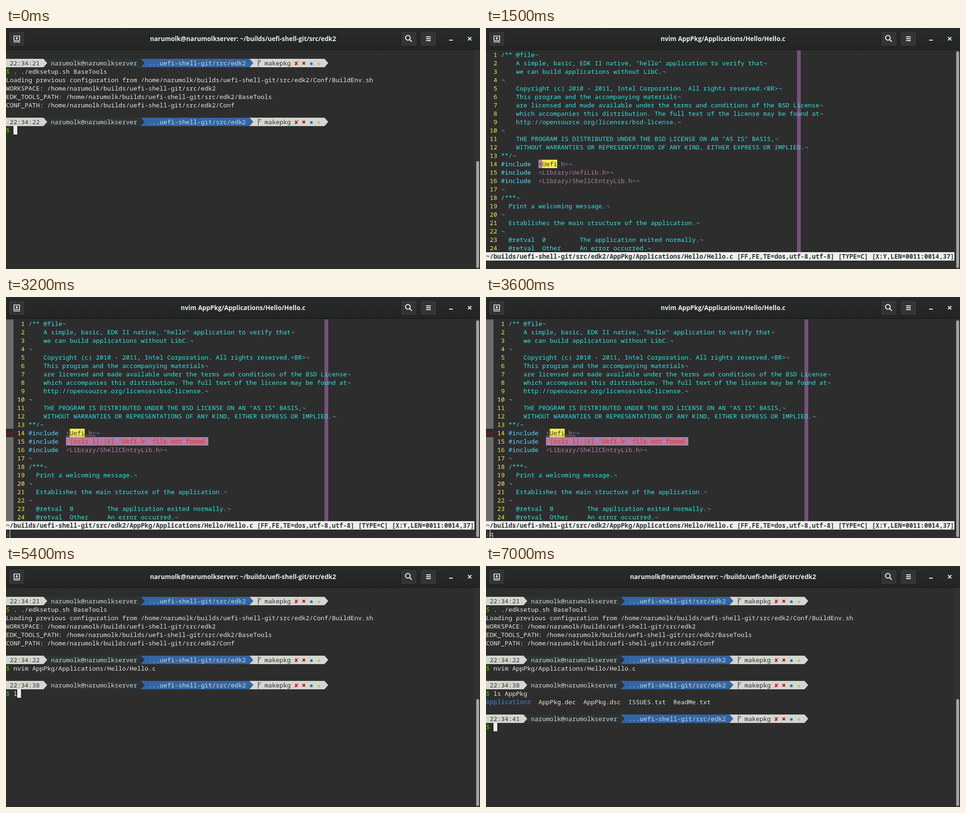
These frames come from a looping animation (1012x516 px, 8 s). An HTML page with a canvas:

```html
<!DOCTYPE html>
<html lang="en">
<head>
<meta charset="utf-8">
<title>Terminal session</title>
<style>
html, body { margin: 0; width: 100%; height: 100%; overflow: hidden; background: #2d2d2d; }
canvas { display: block; }
</style>
</head>
<body>
<canvas id="stage" width="1012" height="516"></canvas>
<script>
const ctx = document.getElementById('stage').getContext('2d');
const LOOP = 8000, CW = 8, CH = 18, TOP = 48;
const MONO = '13.333px "Noto Sans Mono", "Liberation Mono", monospace';
const SYMBOL = '13.333px "DejaVu Sans Mono", "DejaVu Sans", monospace';
const BG = '#2d2d2d', FG = '#e6e6e3', LIGHT = '#d3d7cf', DARK = '#2e3436', BLUE = '#3465a4',
  WHITE = '#eeeeec', YELLOW = '#fce94f', CYAN = '#34e2e2', PURPLE = '#ad7fa8', SKY = '#5fd7ff';

const USER = 'narumolk';
const HOST = USER + '@' + USER + 'server';
const REPO = 'builds/uefi-shell-git/src/edk2';
const HOME = '/home/' + USER + '/' + REPO;
const EDIT = 'nvim AppPkg/Applications/Hello/Hello.c';
const LIST = 'ls AppPkg';
const STATUS = `~/${REPO}/AppPkg/Applications/Hello/Hello.c` +
  ' [FF,FE,TE=dos,utf-8,utf-8] [TYPE=C] [X:Y,LEN=0011:0014,37]';

const SOURCE = `/** @file
    A simple, basic, EDK II native, "hello" application to verify that
    we can build applications without LibC.

    Copyright (c) 2010 - 2011, Intel Corporation. All rights reserved.<BR>
    This program and the accompanying materials
    are licensed and made available under the terms and conditions of the BSD License
    which accompanies this distribution. The full text of the license may be found at
    http://opensource.org/licenses/bsd-license.

    THE PROGRAM IS DISTRIBUTED UNDER THE BSD LICENSE ON AN "AS IS" BASIS,
    WITHOUT WARRANTIES OR REPRESENTATIONS OF ANY KIND, EITHER EXPRESS OR IMPLIED.
**/
#include  <Uefi.h>
#include  <Library/UefiLib.h>
#include  <Library/ShellCEntryLib.h>

/***
  Print a welcoming message.

  Establishes the main structure of the application.

  @retval  0         The application exited normally.
  @retval  Other     An error occurred.`.split('\n');

// Keystrokes: [time, characters visible from then on]
const EDIT_KEYS = [[500, 1], [600, 2], [800, EDIT.length]];
const LIST_KEYS = [[5400, 1], [5500, 2], [5700, 3], [5900, 4], [6000, 5], [6400, LIST.length]];

const rowY = row => TOP + row * CH;

function box(x, y, w, h, color) {
  ctx.fillStyle = color;
  ctx.fillRect(x, y, w, h);
}

function cells(col, row, count, color) {
  box(col * CW, rowY(row), count * CW, CH, color);
}

function text(str, col, row, color = FG, font = MONO) {
  ctx.font = font;
  ctx.fillStyle = color;
  ctx.fillText(str, col * CW, rowY(row) + 14);
}

function stroke(path, color, width) {
  ctx.strokeStyle = color;
  ctx.lineWidth = width;
  ctx.stroke(new Path2D(path));
}

function round(x, y, w, h, r, color) {
  ctx.beginPath();
  ctx.roundRect(x, y, w, h, r);
  ctx.fillStyle = color;
  ctx.fill();
}

function typed(str, keys, t) {
  let count = 0;
  for (const [at, n] of keys) if (t >= at) count = n;
  return str.slice(0, count);
}

function header(title) {
  const shade = ctx.createLinearGradient(0, 0, 0, 46);
  shade.addColorStop(0, '#272b2a');
  shade.addColorStop(1, '#222524');
  box(0, 0, 1012, 46, shade);
  box(0, 46, 1012, 1, '#191b1a');
  for (const x of [5, 842, 884]) {
    round(x, 6, 36, 34, 5, '#171918');
    round(x + 1, 7, 34, 32, 4, '#323534');
  }
  stroke('M17 17H29V27H17ZM23 19V25M20 22H26M16 30H30', WHITE, 1.7);
  stroke('M863 21A5 5 0 1 1 853 21A5 5 0 1 1 863 21M861.5 24.5L866.5 29.5', WHITE, 2.2);
  for (const y of [18, 22, 26]) box(897, y, 10, 2, WHITE);
  box(946, 25, 8, 2, WHITE);
  stroke('M986.5 19.5L993.5 26.5M993.5 19.5L986.5 26.5', WHITE, 2);
  ctx.font = 'bold 13.35px "Open Sans", "Noto Sans", sans-serif';
  ctx.fillStyle = WHITE;
  ctx.textAlign = 'center';
  ctx.fillText(title, 506, 28);
  ctx.textAlign = 'left';
}

function scrollbar(top) {
  box(1001, 47, 11, 469, '#323232');
  round(1004, top, 6, 514 - top, 3, '#a4a4a2');
}

function arrow(col, row, color, behind) {
  const x = col * CW, y = rowY(row);
  cells(col, row, 1, behind);
  ctx.fillStyle = color;
  ctx.fill(new Path2D(`M${x} ${y}l8 9l-8 9z`));
}

function prompt(row, clock) {
  cells(0, row, 10, LIGHT);
  cells(11, row, 25, DARK);
  cells(37, row, 28, BLUE);
  cells(66, row, 19, LIGHT);
  arrow(10, row, LIGHT, DARK);
  arrow(36, row, DARK, BLUE);
  arrow(65, row, BLUE, LIGHT);
  arrow(85, row, LIGHT, BG);
  text(clock, 1, row, DARK);
  text(HOST, 12, row, LIGHT);
  text('...uefi-shell-git/src/edk2', 38, row, LIGHT);
  stroke(`M538.5 ${rowY(row) + 1}v16M538.5 ${rowY(row) + 12}q0 -2 2 -4t2 -5M540.5 ${rowY(row) + 5}l2 -2l2 2`, DARK, 1);
  text('makepkg', 69, row, DARK);
  text('✘', 77, row, '#cc0000', SYMBOL);
  text('✖', 79, row, '#cc0000', SYMBOL);
  text('✹', 81, row, BLUE, SYMBOL);
  text('✭', 83, row, '#c4a000', SYMBOL);
}

function command(row, str, active) {
  text('$', 0, row, '#4e9a06', 'bold ' + MONO);
  text(str, 2, row);
  if (active) cells(2 + str.length, row, 1, WHITE);
}

function shell(t) {
  const edited = t >= 3900, listed = t >= 7000;
  header(t >= 6700 && !listed ? LIST : `${HOST}: ~/${REPO}`);
  scrollbar(285);
  prompt(1, '22:34:21');
  command(2, '. ./edksetup.sh BaseTools');
  text(`Loading previous configuration from ${HOME}/Conf/BuildEnv.sh`, 0, 3);
  text('WORKSPACE: ' + HOME, 0, 4);
  text(`EDK_TOOLS_PATH: ${HOME}/BaseTools`, 0, 5);
  text(`CONF_PATH: ${HOME}/Conf`, 0, 6);
  prompt(8, '22:34:22');
  command(9, typed(EDIT, EDIT_KEYS, t), !edited);
  if (!edited) return;
  prompt(11, '22:34:38');
  command(12, typed(LIST, LIST_KEYS, t), !listed);
  if (!listed) return;
  text('Applications', 0, 13, BLUE, 'bold ' + MONO);
  text('AppPkg.dec  AppPkg.dsc  ISSUES.txt  ReadMe.txt', 14, 13);
  prompt(15, '22:34:41');
  command(16, '', true);
}

function editor(t) {
  const checked = t >= 1700;
  const shift = checked ? 2 : 0, left = 4 + shift;
  header(EDIT);
  scrollbar(50);
  cells(left + 79, 0, 1, '#75507b');
  box((left + 79) * CW, TOP, CW, 24 * CH, '#75507b');

  SOURCE.forEach((line, row) => {
    const number = String(row + 1);
    if (checked && row !== 13) cells(0, row, 2, '#6c6c6c');
    text(number, 3 + shift - number.length, row, YELLOW);
    if (checked && row === 14) {
      text('#include', left, row, SKY);
      cells(left + 10, row, 38, PURPLE);
      text("[ccls 1] [E] 'Uefi.h' file not found", left + 11, row, '#e8443a', 'bold ' + MONO);
      return;
    }
    if (line.startsWith('#')) {
      text('#include', left, row, SKY);
      text(line.slice(10), left + 10, row, PURPLE);
    } else {
      text(line, left, row, CYAN);
    }
    text('¬', left + line.length, row, '#729fcf');
  });

  cells(left + 11, 13, 4, YELLOW);
  text('Uefi', left + 11, 13, DARK);
  if (checked) {
    text('>>', 0, 13, '#cc0000');
    box((left + 10) * CW, rowY(13) + 15, 8 * CW, 1, PURPLE);
  } else {
    cells(left + 10, 13, 1, PURPLE);
    text('<', left + 10, 13, BG);
  }

  cells(0, 24, 125, WHITE);
  text(STATUS, 0, 24, DARK, 'bold ' + MONO);
  if (t >= 3200) {
    text(t >= 3600 ? ':q' : ':', 0, 25, LIGHT);
    box(8, rowY(25), 1, CH, WHITE);
  }
}

function draw(now) {
  const t = now % LOOP;
  box(0, 0, 1012, 516, BG);
  (t >= 1500 && t < 3900 ? editor : shell)(t);
  requestAnimationFrame(draw);
}
requestAnimationFrame(draw);
</script>
</body>
</html>
```
